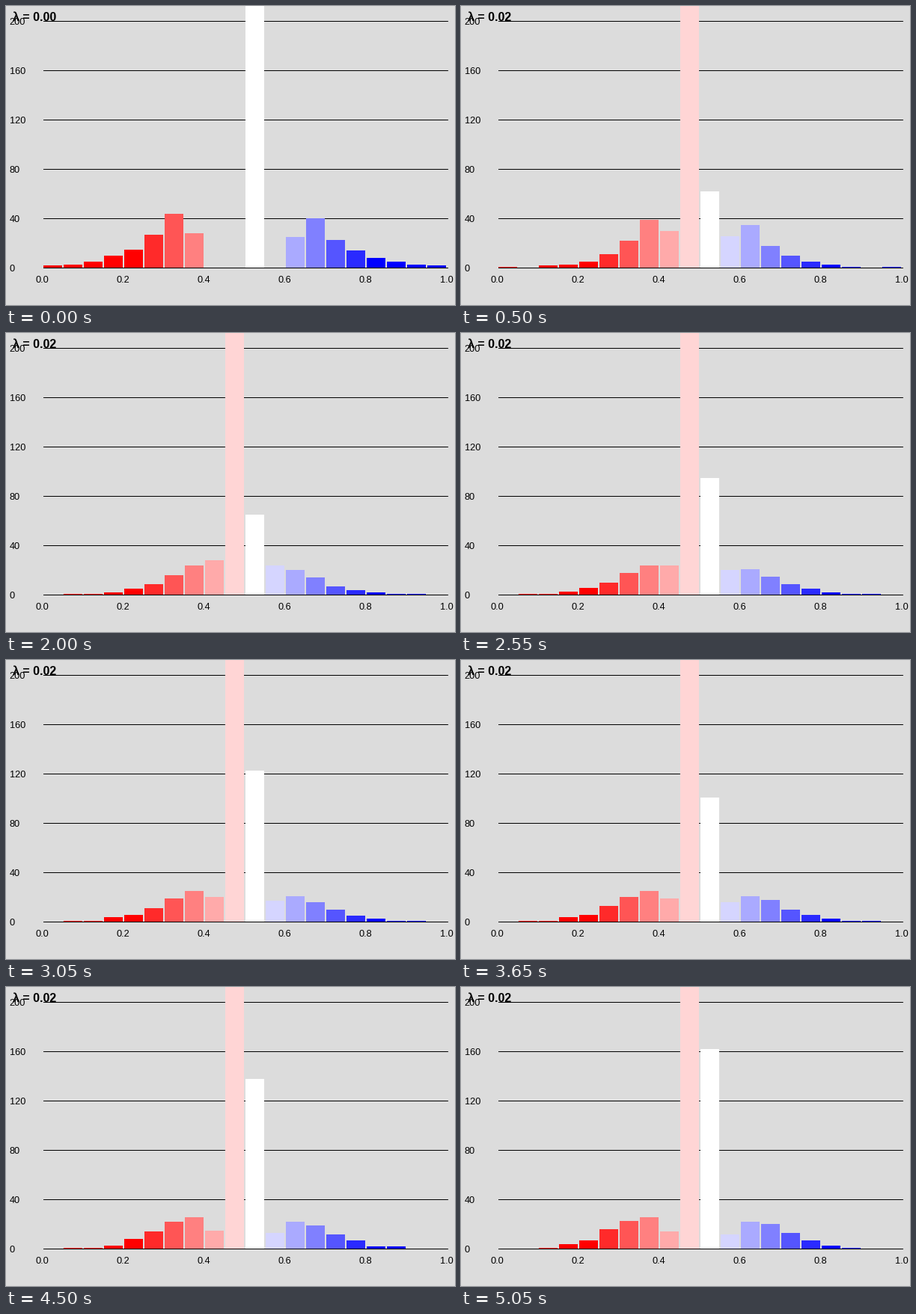
A matplotlib script for the animation above (5100 ms loop, 600 by 400 pixels).

```python
import matplotlib.pyplot as plt
import numpy as np
from matplotlib.animation import FuncAnimation
from matplotlib.patches import Rectangle

W, H, DPI = 600, 400, 100
FRAMES, STEP_MS = 102, 50
SETTLE = 22  # steps until the weights have collapsed towards the centre
BINS, X0, PITCH, BAR_W = 20, 50, 27, 25
BASE, UNIT = 350, 1.65
TALL = 260  # taller than the stage
BG = "#dcdcdc"


def lerp(a, b, u):
    return a + (b - a) * u


def shape(i):
    """Gap around the centre, width and steepness of the weight tails."""
    if i < SETTLE:
        u = 1 - (1 - i / SETTLE) ** 2
        return lerp(2.57, 1, u), lerp(1.9, 1.5, u), lerp(1, 1.1, u)
    age = i - SETTLE
    return 1, 2.8 - 1.3 * np.exp(-age / 28), 1.1 + 0.7 * age / (FRAMES - 1 - SETTLE)


def tail(i, total):
    """Counts per bin from the centre outwards (Weibull tail)."""
    gap, width, steep = shape(i)
    dist = np.maximum(np.arange(1, 11) - gap, 0)
    return -np.diff(np.round(total * np.exp(-(dist / width) ** steep)))


def histogram(i):
    ends = [0, SETTLE, FRAMES - 1]
    left = tail(i, np.interp(i, ends, [137, 84, 91]))
    right = tail(i, np.interp(i, ends, [122, 71, 78]))
    mid = round(np.interp(i, [0, 22, 40, 61, 73, 90, 101],
                          [60, 64, 65, 123, 101, 138, 162]))
    pair = [TALL, mid] if i else [0, TALL]
    return np.concatenate([left[::-1], pair, right])


def bin_color(b):
    fade = max(0, 1 - abs(b - 10) / 6)
    return (1, fade, fade) if b < 10 else (fade, fade, 1)


fig = plt.figure(figsize=(W / DPI, H / DPI), dpi=DPI, facecolor=BG)
ax = fig.add_axes([0, 0, 1, 1])
ax.set_xlim(0, W)
ax.set_ylim(H, 0)
ax.axis("off")


def box(x, y, w, h, color, z):
    return ax.add_patch(Rectangle((x, y), w, h, fc=color, lw=0, zorder=z))


def label(x, y, s, px, **kw):
    return ax.text(x, y, s, fontsize=px * 72 / DPI, color="black", zorder=4,
                   family=["Liberation Sans", "DejaVu Sans"],
                   ha="left", va="baseline", **kw)


for v in range(0, 201, 40):
    y = BASE - v * UNIT
    box(X0, y, 541, 1, "black", 1 if v else 3)
    label(4.6, y + 5, str(v), 12.7)
for k in range(6):
    label(39.8 + 108 * k, 370.4, f"{k / 5:.1f}", 12.7)

bars = [box(X0 + PITCH * b, BASE, BAR_W, 0, bin_color(b), 2) for b in range(BINS)]
title = label(8.7, 20, "", 16, weight="bold")


def draw(i):
    for bar, n in zip(bars, histogram(i)):
        h = int(n * UNIT)
        bar.set_y(BASE - h)
        bar.set_height(h)
    title.set_text(f"λ = {0.02 if i else 0:.2f}")
    return [*bars, title]


anim = FuncAnimation(fig, draw, frames=FRAMES, interval=STEP_MS,
                     repeat=True, repeat_delay=0)
plt.show()
```
